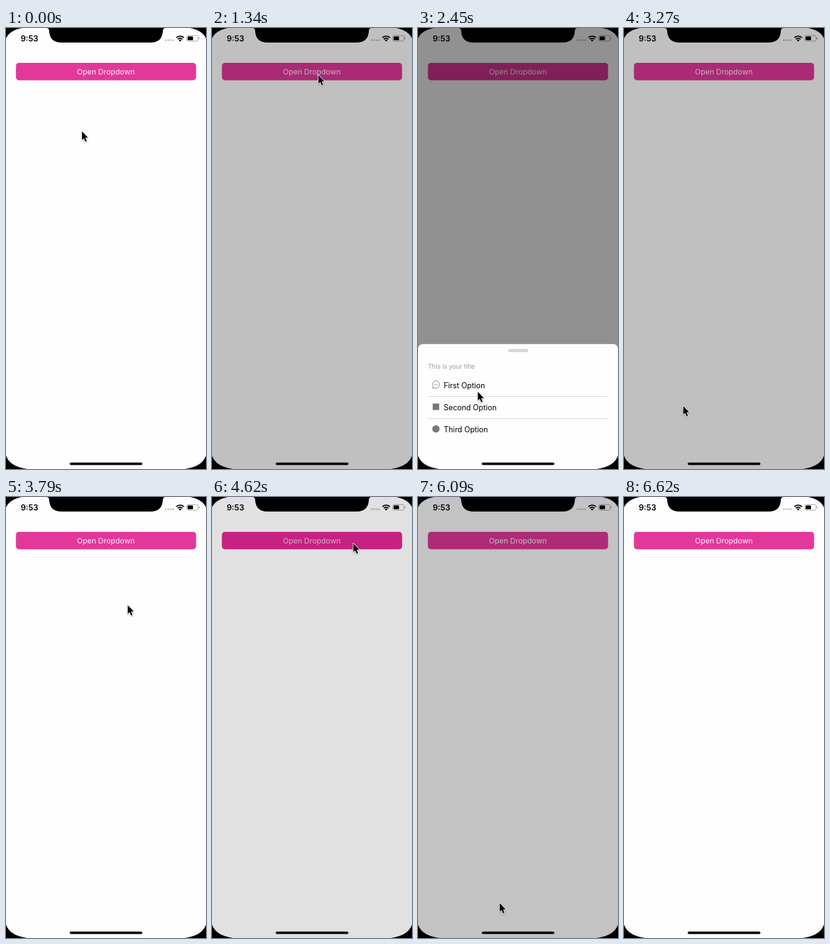
An HTML page with a canvas for the animation above (7.06 s loop, 329 by 721 pixels).

```html
<!DOCTYPE html>
<html lang="en">
<head>
<meta charset="utf-8">
<title>Dropdown sheet</title>
<style>
  html, body { margin: 0; width: 100%; height: 100%; overflow: hidden; background: #000; }
  canvas { display: block; width: 329px; height: 721px; }
</style>
</head>
<body>
<canvas id="stage"></canvas>
<script>
const W = 329, H = 721, LOOP = 7060;
const FONT = 'Inter, "Liberation Sans", sans-serif';
const DIM = 0.43, FADE = 250, PRESS = 90, SHEET_H = 204;

const canvas = document.getElementById('stage');
const ctx = canvas.getContext('2d');
const dpr = window.devicePixelRatio || 1;
canvas.width = W * dpr;
canvas.height = H * dpr;

const clamp = u => Math.max(0, Math.min(1, u));
const progress = (t, start, span) => clamp((t - start) / span);
const ease = {
  in: u => u * u,
  out: u => 1 - (1 - u) * (1 - u),
  both: u => (1 - Math.cos(Math.PI * u)) / 2
};

// tap: first visible response; fade: start of the backdrop fade
const visits = [
  { tap: 1220, fade: 1200, closeTap: 3220, closeFade: 3162 },
  { tap: 4560, fade: 4556, closeTap: 6030, closeFade: 5975 }
];

// Pointer moves: start, end, target x, target y, easing
const moves = [
  [70, 750, 168, 82, 'both'],
  [820, 1040, 175, 77, 'both'],
  [1470, 1870, 121, 408, 'in'],
  [1870, 2450, 98.5, 595, 'out'],
  [2700, 2980, 97.5, 618, 'both'],
  [3400, 3910, 215.5, 112, 'both'],
  [4050, 4390, 232.5, 76, 'both'],
  [4790, 5260, 148, 622, 'in'],
  [5260, 5430, 143.5, 690, 'out'],
  [5540, 5790, 134.5, 664, 'both'],
  [6300, 6600, 128, 735, 'in']
];

function pointerAt(t) {
  let x = 125, y = 169;
  if (t < 120) return [x, y];
  for (const [start, end, tx, ty, kind] of moves) {
    if (t < start) break;
    const k = ease[kind](progress(t, start, end - start));
    x += (tx - x) * k;
    y += (ty - y) * k;
  }
  return [x, y];
}

function stateAt(t) {
  const s = { dim: 0, sheet: 0, pressed: false };
  for (const v of visits) {
    if (t < v.tap) continue;
    s.pressed = t < v.tap + PRESS;
    s.dim = DIM * progress(t, v.fade, FADE);
    s.sheet = ease.out(progress(t, v.fade + 170, 300));
    if (t >= v.closeTap) {
      s.dim = DIM * (1 - progress(t, v.closeFade, FADE));
      s.sheet = 1 - progress(t, v.closeTap - 20, 65);
    }
  }
  return s;
}

function box(x, y, w, h, r, fill) {
  ctx.beginPath();
  ctx.roundRect(x, y, w, h, r);
  ctx.fillStyle = fill;
  ctx.fill();
}

function disc(x, y, r, fill) {
  ctx.beginPath();
  ctx.arc(x, y, r, 0, Math.PI * 2);
  ctx.fillStyle = fill;
  ctx.fill();
}

function label(text, x, y, size, fill, align = 'left', weight = 400) {
  ctx.font = `${weight} ${size}px ${FONT}`;
  ctx.textAlign = align;
  ctx.fillStyle = fill;
  ctx.fillText(text, x, y);
}

function drawStatus() {
  label('9:53', 24.3, 21.6, 13, '#000', 'left', 600);
  for (let i = 0; i < 4; i++) disc(263 + i * 4, 20, 1.45, '#bdbdbd');

  ctx.save();
  ctx.beginPath();
  ctx.moveTo(286.5, 22.2);
  ctx.arc(286.5, 22.2, 10.2, -Math.PI * 0.75, -Math.PI * 0.25);
  ctx.closePath();
  ctx.clip();
  disc(286.5, 22.2, 3.1, '#000');
  ctx.strokeStyle = '#000';
  ctx.lineWidth = 2;
  for (const r of [5.4, 9]) {
    ctx.beginPath();
    ctx.arc(286.5, 22.2, r, Math.PI, Math.PI * 2);
    ctx.stroke();
  }
  ctx.restore();

  ctx.strokeStyle = '#9a9a9a';
  ctx.lineWidth = 0.9;
  ctx.beginPath();
  ctx.roundRect(297.4, 12.3, 18.6, 9.2, 2.6);
  ctx.stroke();
  box(298.8, 13.7, 8.8, 6.4, 1.2, '#000');
  box(317, 15.4, 1.2, 3, 0.6, '#9a9a9a');
}

function drawButton(pressed) {
  box(16.3, 57, 296.4, 28.4, 5, pressed ? '#de2692' : '#e2389a');
  label('Open Dropdown', 164.3, 75.9, 12.3,
    pressed ? 'rgba(255,255,255,.72)' : 'rgba(255,255,255,.93)', 'center');
}

function drawBubble(x, y) {
  ctx.strokeStyle = '#777';
  ctx.lineWidth = 0.9;
  ctx.beginPath();
  ctx.arc(x, y, 6, Math.PI * 0.72, Math.PI * 2.62);
  ctx.lineTo(x - 5.8, y + 5.9);
  ctx.closePath();
  ctx.stroke();
  for (const dx of [-2.6, 0, 2.6]) disc(x + dx, y, 0.75, '#777');
}

function drawSheet(open) {
  if (open <= 0) return;
  ctx.save();
  ctx.translate(0, (1 - open) * SHEET_H);
  box(0, 516.7, W, SHEET_H + 10, [8, 8, 0, 0], '#fefefe');
  box(148.5, 524.7, 32.5, 5.4, 2.7, '#d6d6d6');
  label('This is your title', 16.4, 556.6, 10.3, '#999');
  ['First', 'Second', 'Third'].forEach((name, i) => {
    label(name + ' Option', 42.3, 589.3 + i * 36, 12.4, '#000');
    if (i < 2) box(16.3, 602 + i * 36, 296.4, 0.9, 0, '#d6d6d6');
  });
  drawBubble(29.5, 583);
  box(24.2, 614, 10.6, 10.6, 0, '#777');
  disc(29.5, 655.5, 6, '#777');
  ctx.restore();
}

function drawBezel() {
  ctx.fillStyle = '#000';
  for (const side of [1, -1]) {
    ctx.save();
    if (side < 0) {
      ctx.translate(W, 0);
      ctx.scale(-1, 1);
    }
    ctx.fill(new Path2D('M0 0V17Q6 4 26 0ZM0 721V699Q6 717 35 721Z'));
    ctx.restore();
  }
  ctx.fill(new Path2D('M66 0Q71 0 71 5Q72 23.8 91 23.8H238Q257 23.8 258 5Q258 0 263 0Z'));
  box(104.8, 710.4, 119.6, 4.1, 2.05, '#000');
}

const arrow = new Path2D('M0 0V14L3.1 11.2L5.5 16.8L7.8 15.8L5.4 10.4L9.7 10.1Z');

function drawPointer(x, y) {
  ctx.save();
  ctx.translate(x, y);
  ctx.lineJoin = 'round';
  ctx.lineWidth = 1.8;
  ctx.strokeStyle = '#fff';
  ctx.shadowColor = 'rgba(0,0,0,.4)';
  ctx.shadowBlur = 2 * dpr;
  ctx.shadowOffsetY = 0.8 * dpr;
  ctx.stroke(arrow);
  ctx.shadowColor = 'transparent';
  ctx.fillStyle = '#000';
  ctx.fill(arrow);
  ctx.restore();
}

function draw(t) {
  const s = stateAt(t);
  ctx.setTransform(dpr, 0, 0, dpr, 0, 0);
  box(0, 0, W, H, 0, '#fefefe');
  drawStatus();
  drawButton(s.pressed);
  box(0, 0, W, H, 0, `rgba(0,0,0,${s.dim})`);
  drawSheet(s.sheet);
  drawBezel();
  if (t < 6600) drawPointer(...pointerAt(t));
}

const begin = performance.now();
function tick() {
  draw((performance.now() - begin) % LOOP);
  requestAnimationFrame(tick);
}
tick();
</script>
</body>
</html>
```
